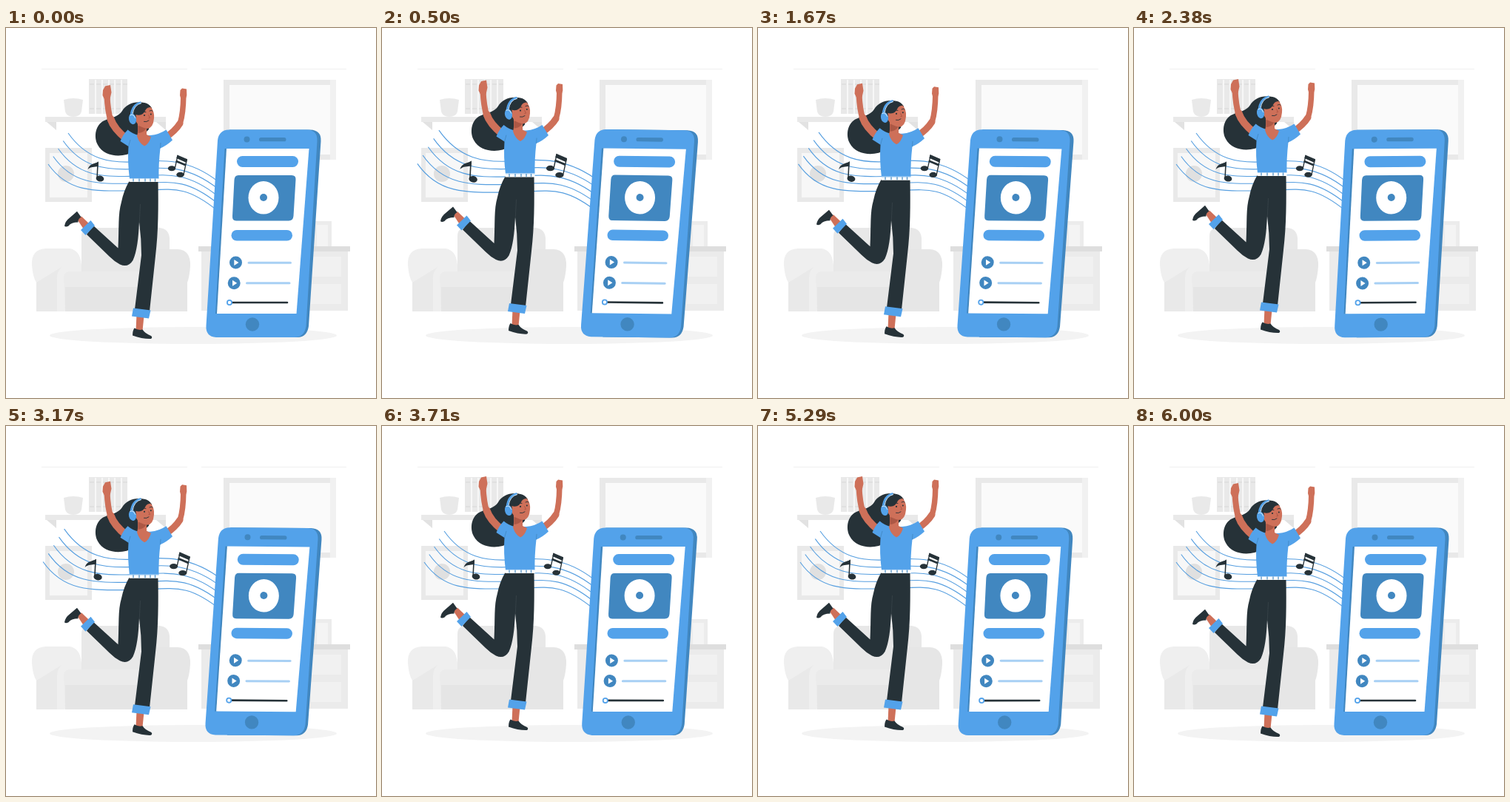
An HTML page for the animation above (6040 ms loop, 500 px wide and 500 px high).

```html
<!DOCTYPE html>
<html lang="en">
<head>
<meta charset="utf-8">
<title>Dancing to music</title>
<style>
  html, body { margin: 0; width: 100%; height: 100%; overflow: hidden; background: #fff; }
  svg { display: block; width: 100vw; height: 100vh; }
  .skin { fill: #ce7059; }
  .dark { fill: #263238; }
  .blue { fill: #53a2ea; }
  .deep { fill: #4187c0; }
  .limb { fill: none; stroke: #ce7059; stroke-linecap: round; stroke-linejoin: round; }
  .ink { fill: none; stroke: #263238; stroke-linecap: round; }
</style>
</head>
<body>
<svg viewBox="0 0 500 500">
  <!-- room -->
  <g id="room">
    <path d="M48 55.5H245M264 55.5H460" stroke="#f0f0f0" fill="none"/>
    <g fill="#e9e9e9">
      <path d="M112 69H164V116H112Z"/>
      <path d="M78 97Q91 93 104 97L102 113Q100 120 91 120Q82 120 80 113Z"/>
      <path d="M53 120H216V127H53Z"/>
      <path d="M55 127H68V138ZM203 127H216V138Z" fill="#e2e2e2"/>
      <path d="M53 162H116V235H53Z"/>
      <path d="M294 70H446V178H294Z"/>
    </g>
    <path d="M121 70V116M130 70V116M139 70V116M147 70V116M156 70V116" stroke="#f7f7f7" stroke-width="2"/>
    <path d="M113 76H164M113 109H164" stroke="#dedede" stroke-width="1.5" stroke-dasharray="6 3"/>
    <path d="M59 169H110V229H59Z" fill="#f7f7f7"/>
    <circle cx="81" cy="197" r="11" fill="#e0e0e0"/>
    <path d="M302 77H438V171H302Z" fill="#fafafa"/>
    <path d="M438 70H446V178H438Z" fill="#f1f1f1"/>
    <!-- sofa -->
    <path d="M102 281Q102 270 114 270H207Q220 271 221 284V340H102Z" fill="#e8e8e8"/>
    <path d="M35 320Q34 299 54 298H86Q100 300 102 320V383H41V344Q36 336 35 320Z" fill="#efefef"/>
    <path d="M180 320Q181 300 200 299H232Q250 300 249 322Q248 336 245 344V383H184Z" fill="#e6e6e6"/>
    <path d="M78 336Q79 329 87 329H184Q192 330 191 338V383H80Z" fill="#ebebeb"/>
    <path d="M80 350H190V383H80Z" fill="#e5e5e5"/>
    <path d="M41 344V383H69V340Q68 326 80 320" fill="#e9e9e9"/>
    <!-- cabinet -->
    <path d="M412 261H440V295H412Z" fill="#ececec"/>
    <path d="M420 266H435V295H420Z" fill="#f4f4f4"/>
    <path d="M264 302H462V382H264Z" fill="#ebebeb"/>
    <path d="M260 295H465V302H260Z" fill="#dedede"/>
    <path d="M412 309H453V336H412ZM412 346H453V373H412Z" fill="#f1f1f1"/>
  </g>
  <ellipse cx="253" cy="415.5" rx="194" ry="11.5" fill="#f3f3f3"/>

  <!-- music -->
  <g id="music">
    <g id="staff" fill="none" stroke="#579fe0" stroke-width="1.1"/>
    <g class="dark">
      <ellipse cx="127" cy="203.5" rx="5.4" ry="4" transform="rotate(12 127 203.5)"/>
      <path d="M123.3 182L125 180.5L123.8 203H122.3Z"/>
      <path d="M125 180.5C119 184 113 183 110.500 191C115 187 119 188 124.600 187Z"/>
      <ellipse cx="224" cy="189.800" rx="5.200" ry="3.500"/>
      <ellipse cx="235.500" cy="198.300" rx="5.200" ry="3.500"/>
      <path d="M231.500 171.500L245 177.300L243.800 182L230.300 176Z"/>
      <path d="M230 178.500L243.300 184L242.800 186.800L229.300 181Z"/>
    </g>
    <path class="ink" stroke-width="1.300" d="M232 172.500L228.300 189.500M244.300 178L240 198"/>
  </g>

  <!-- phone -->
  <g id="phone">
    <path class="deep" d="M302 137.500H411Q426.500 138 425.500 153L409 403Q407 417.500 394 418H300Z"/>
    <path class="blue" d="M301 137.500H407Q421.500 138 420.500 153L405.500 403Q403.500 417.500 390 418H284Q269.500 417 270.500 402L286 152Q287.500 138 301 137.500Z"/>
    <path class="deep" d="M295.500 163H300L287 386H283Z"/>
    <path d="M298 163H409.500L392.500 386H285Z" fill="#fff"/>
    <circle class="deep" cx="325.500" cy="150.500" r="4"/>
    <rect class="deep" x="342" y="148" width="36.500" height="5.300" rx="2.600"/>
    <rect class="blue" x="312" y="173" width="83" height="15" rx="7.500"/>
    <path class="deep" d="M314 199H386Q392 199 391.500 205L388.500 254Q388 260.500 382 260.500H311Q305.500 260.500 306 254L308.500 205Q309 199 314 199Z"/>
    <ellipse cx="348" cy="229.300" rx="20.500" ry="22.300" fill="#fff"/>
    <circle class="deep" cx="348" cy="229" r="5"/>
    <rect class="blue" x="304.500" y="273" width="82.500" height="14.500" rx="7.200"/>
    <g class="deep">
      <circle cx="310.500" cy="317" r="8.500"/>
      <circle cx="308.200" cy="344.700" r="8.500"/>
    </g>
    <path d="M308.300 313V321L314.500 317ZM306 340.700V348.700L312.200 344.700Z" fill="#fff"/>
    <path d="M328 317.300H384.500M325.500 344.800H383" stroke="#a8d0f4" stroke-width="3" stroke-linecap="round"/>
    <path class="ink" stroke-width="2.600" d="M303 371H380"/>
    <circle cx="302" cy="371" r="3.100" fill="#fff" stroke="#53a2ea" stroke-width="1.800"/>
    <circle class="deep" cx="333" cy="400.500" r="9.200"/>
  </g>

  <!-- dancer -->
  <g id="dancer">
    <path class="dark" d="M187 101C174 98 162 103 157 112C152 120 143 121 133 125C121 130 118 147 124 158C131 171 148 175 163 171C172 168 178 160 181 149L193 137L197 108Q193 102 187 101Z"/>
    <!-- standing leg -->
    <path class="skin" d="M176.500 387L186.500 389L184.500 409H175.500Z"/>
    <path class="dark" d="M173.500 405.500Q179 409 184.500 407.500Q188 413 196 416Q198.500 418 196 420Q185 420.500 171 415.500Q171 409 173.500 405.500Z"/>
    <!-- raised foot -->
    <path class="skin" d="M96.500 259L102 254.500L113 265L105 272Z"/>
    <path class="dark" d="M79 267.500Q80 261 86 256.500L96 247.800L101.500 255.500Q97 258 97.500 262.500Q88 262.500 84.500 267.500Q80.500 269.500 79 267.500Z"/>
    <!-- trousers -->
    <path class="dark" d="M166.500 207H205.500C206 240 206 275 202 308L194 383L174 380L183 307Q183 285 180 262C179 284 177 302 171.500 314Q165 324.500 154 319.500Q147 316 140 309L109 279L118 267L151.500 297.500C153 270 151 252 156 235Q159 220 166.500 207Z"/>
    <path d="M180.300 262L181.500 238" stroke="#3c474c" stroke-width=".7"/>
    <path class="blue" d="M101 273L114.500 260L120 267L107.500 280ZM172 378.500L195.500 381.500L193 392.500L170 389.500Z"/>
    <!-- arms -->
    <path class="limb" stroke-width="10" d="M163 150C153 142 145 134 141.500 123"/>
    <path class="limb" stroke-width="8" d="M141.500 125Q137.500 112 136.500 92"/>
    <path class="limb" stroke-width="9" d="M214 149Q229 139 235 129"/>
    <path class="limb" stroke-width="7.500" d="M235.500 128Q239.500 115 239.800 92"/>
    <path class="skin" d="M131 84L134 78.500L141 77L142.500 87L140.500 96H133L130.500 91ZM235.500 84L238 81.500L244 82.500L244.300 91L242.500 96.500H236.500L235 91Z"/>
    <!-- shirt -->
    <path class="blue" d="M164.500 137.500Q171 143 179 145H195Q207 144 216.500 137.500L225 151.500Q217 159 208.500 162.500Q206 184 206.500 204H167Q164 180 165.500 160L154.500 153Q158 144 164.500 137.500Z"/>
    <path d="M165.500 160L168 151M208.500 162.500L209 155" stroke="#4187c0" stroke-width=".8"/>
    <path d="M166.800 203H206.500V208H166.500Z" fill="#fff"/>
    <path d="M167 203.500H206.500" stroke="#b9d9f5" stroke-width="1"/>
    <path d="M172 203.500V207.500M180 203.500V207.500M188 203.500V207.500M195 203.500V207.500M201.500 203.500V207.500" stroke="#4187c0" stroke-width="1.200"/>
    <!-- head -->
    <path class="skin" d="M177.500 126L190 132V144L196 147Q193 157 187 159.500Q180 156 177 146Q179 140 177.500 126Z"/>
    <path d="M178.500 132L190 135Q186 142 178.500 142Z" fill="#ad5845"/>
    <path class="skin" d="M175 112Q184 101 195 106Q201 113 200 122Q199 135 191 136Q181 135 176 127Z"/>
    <path class="dark" d="M196 107Q191 101 183 101Q170 104 169 119L174 130Q176 122 175 117Q185 120 189 110Q191 107 196 107Z"/>
    <g class="dark">
      <circle cx="187" cy="118" r="1.100"/>
      <circle cx="195.800" cy="116.500" r="1"/>
    </g>
    <path class="ink" stroke-width=".9" d="M184 114.500Q186.500 112.500 189 113.500M194 112Q196.500 110.500 198 112M186.500 126.500Q190 127.500 193 125"/>
    <path d="M192.500 117.500L194.500 121.500L192.500 122" fill="none" stroke="#a84f3f" stroke-width=".8"/>
    <path d="M182.500 100.500Q170 103.500 169 119" fill="none" stroke="#53a2ea" stroke-width="2.800"/>
    <path d="M183 101.500Q172.500 104 171 117" fill="none" stroke="#d4e9fb" stroke-width="1"/>
    <ellipse class="blue" cx="171" cy="123" rx="5" ry="7.200" transform="rotate(-12 171 123)"/>
    <path d="M167.500 118Q172 115 175 122" fill="none" stroke="#b9dcf8" stroke-width="1.200"/>
  </g>
</svg>
<script>
const LOOP = 6040, FPS = 24, BEAT = 1.5;
const [music, phone, dancer, staff] =
  ["music", "phone", "dancer", "staff"].map(id => document.getElementById(id));

for (let i = 0; i < 5; i++) {
  const line = document.createElementNS("http://www.w3.org/2000/svg", "path");
  const x = 84 - 6.75 * i, y = 142 + 10.5 * i, mid = 181 + 9.7 * i, end = 207 + 10 * i;
  line.setAttribute("d", `M${x} ${y}C${x + 26} ${y + 37} ${x + 58} ${mid + 1} 170 ${mid}S240 ${mid - 10} 286 ${end}`);
  staff.append(line);
}

// [seconds, scale]
const pulse = [[0, 1], [.64, 1.097], [1, 1.057], [1.27, 1.036], [1.9, 1.012],
  [2.375, 1], [2.95, 1.09], [3.167, 1.057], [3.55, 1], [7, 1]];

function along(steps, s) {
  const i = steps.findIndex(step => step[0] > s);
  const [a, from] = steps[i - 1], [b, to] = steps[i];
  return from + (to - from) * (s - a) / (b - a);
}

// Triangle wave: 0 at the start, 1 halfway
const triangle = p => 1 - Math.abs(1 - 2 * (p - Math.floor(p)));

function draw(ms) {
  const s = Math.floor((ms % LOOP + 5) * FPS / 1000) / FPS;
  const lift = 9.6 * triangle(s / BEAT);
  const tilt = 2 * triangle(s / BEAT + .25) - 1;
  const k = along(pulse, s);
  dancer.setAttribute("transform", `translate(0 ${-lift})`);
  phone.setAttribute("transform", `rotate(${tilt} 347.5 278)`);
  music.setAttribute("transform", `translate(178 193) scale(${k}) translate(-178 -193)`);
}

const start = performance.now();
function tick() {
  draw(performance.now() - start);
  requestAnimationFrame(tick);
}
tick();
</script>
</body>
</html>
```
